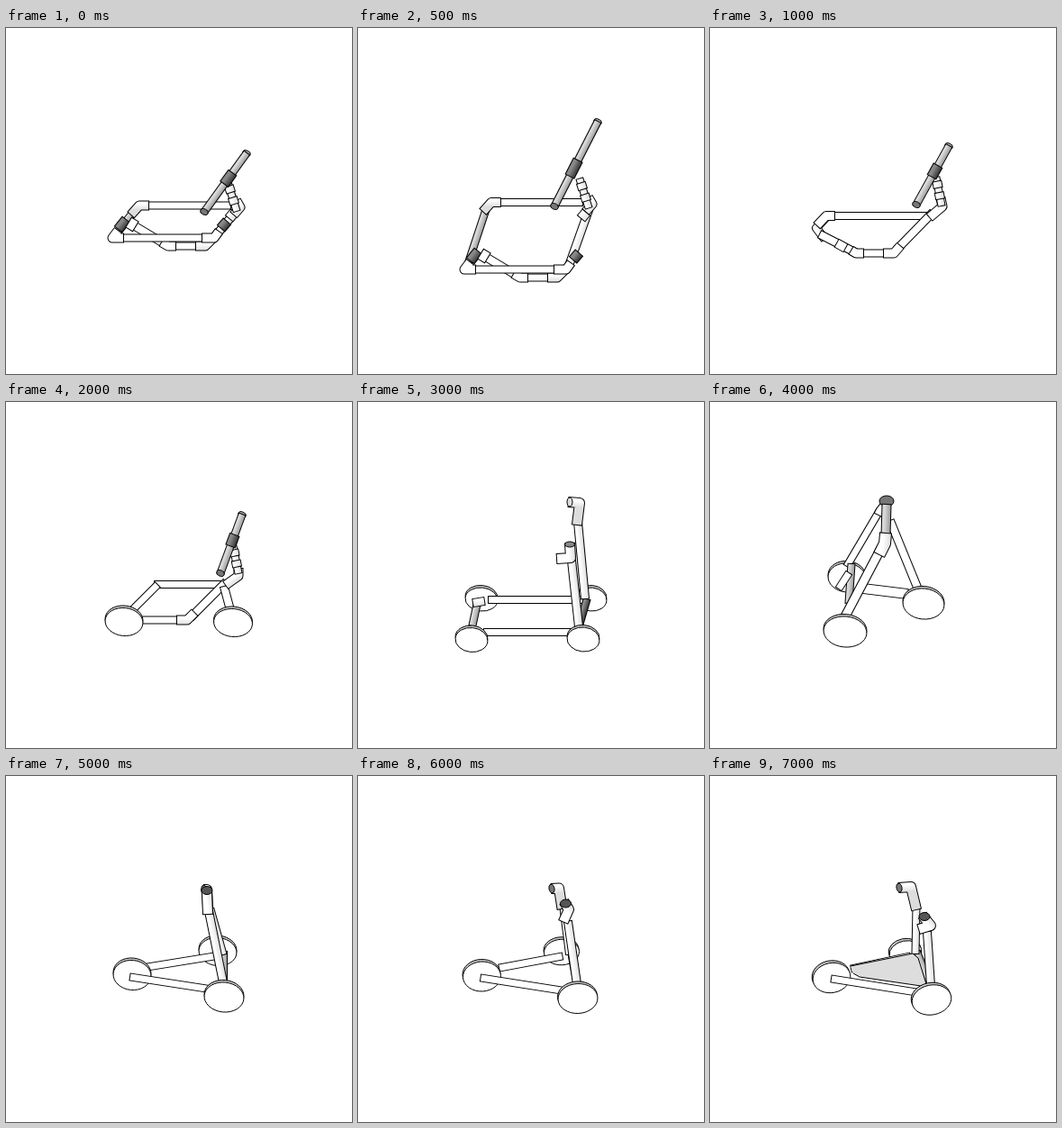
These frames come from a looping animation (384x384 px, 7.5 s). An HTML page with a canvas:

```html
<!DOCTYPE html>
<html>
<head>
<meta charset="utf-8">
<style>
html, body { margin: 0; width: 100%; height: 100%; overflow: hidden; background: #fff; }
canvas { display: block; }
</style>
</head>
<body>
<canvas id="stage" width="384" height="384"></canvas>
<script>
const ctx = document.getElementById('stage').getContext('2d');
const WHITE = ['#fff', '#fff'], PALE = ['#fff', '#ddd'], GREY = ['#d8d8d8', '#999'], DARK = ['#888', '#333'];

function trace(pts) {
  ctx.beginPath();
  pts.forEach(p => ctx.lineTo(p[0], p[1]));
}

// Outlined tube through points; the shade runs across its first section.
function pipe(pts, w, shade = WHITE) {
  const [a, b] = pts, y = pts[pts.length - 1], x = pts[pts.length - 2];
  const away = (p, q) => {
    const d = Math.hypot(p[0] - q[0], p[1] - q[1]) || 1;
    return [p[0] + (p[0] - q[0]) / d, p[1] + (p[1] - q[1]) / d];
  };
  ctx.lineJoin = 'round';
  ctx.strokeStyle = '#000';
  ctx.lineWidth = w + 1;
  trace([away(a, b), ...pts.slice(1, -1), away(y, x)]);
  ctx.stroke();
  const len = Math.hypot(b[0] - a[0], b[1] - a[1]) || 1;
  const nx = (b[1] - a[1]) / len * w / 2, ny = (a[0] - b[0]) / len * w / 2;
  const s = nx + ny > 0 ? -1 : 1;
  const g = ctx.createLinearGradient(a[0] + nx * s, a[1] + ny * s, a[0] - nx * s, a[1] - ny * s);
  g.addColorStop(0.3, shade[0]);
  g.addColorStop(1, shade[1]);
  ctx.strokeStyle = g;
  ctx.lineWidth = w - 1;
  trace(pts);
  ctx.stroke();
}

const tube = (x1, y1, x2, y2, w, shade) => pipe([[x1, y1], [x2, y2]], w, shade);

function disc(x, y, rx, ry, fill, tilt = 0) {
  ctx.beginPath();
  ctx.ellipse(x, y, rx, ry, tilt, 0, 7);
  ctx.fillStyle = fill;
  ctx.fill();
  ctx.strokeStyle = '#000';
  ctx.lineWidth = 1;
  ctx.stroke();
}

function wheel(x, y, rx, ry, tilt = 0.1, dx = 0) {
  disc(x + dx, y - 2.5, rx, ry, '#ccc', tilt);
  disc(x, y, rx, ry, '#fff', tilt);
}

// Straight grey handlebar with a dark coupling at part m of its length.
function handlebar(x1, y1, x2, y2, m) {
  const at = k => [x1 + (x2 - x1) * k, y1 + (y2 - y1) * k];
  disc(x2, y2, 4.5, 3, '#aaa', 0.4);
  tube(x1, y1, x2, y2, 8, GREY);
  pipe([at(m - 0.09), at(m + 0.09)], 11, DARK);
  disc(x1, y1, 4.5, 3.2, '#777', 0.4);
}

function stem(x1, y1, x2, y2) {
  tube(x1, y1, x2, y2, 8, PALE);
  for (const k of [0.25, 0.65]) {
    const x = x1 + (x2 - x1) * k, y = y1 + (y2 - y1) * k;
    tube(x, y, x + (x2 - x1) * 0.2, y + (y2 - y1) * 0.2, 10, PALE);
  }
}

function boxFrame(deep = 0) {
  const top = -deep * 0.1, low = deep;
  tube(157, 197 + top, 249, 197 + top, 8);
  tube(140, 218 + low, 180, 242 + low, 9);
  tube(186, 242 + low, 214, 242 + low, 8);
  pipe([[173, 238 + low], [180, 242 + low], [188, 242 + low]], 10);
  tube(143, 202 + top, 121, 230 + low, 8, GREY);
  pipe([[158, 197 + top], [148, 197 + top], [139, 207 + top]], 10, PALE);
  tube(133, 213 + low, 125, 223 + low, 11, DARK);
  tube(143, 213 + low, 137, 223 + low, 9);
  pipe([[211, 242 + low], [221, 242 + low], [231, 232 + low]], 10, PALE);
  tube(234, 229 + low, 258, 200 + top, 9, PALE);
  tube(239, 222 + low, 245, 215 + low, 11, DARK);
  tube(248, 211, 253, 205, 11, PALE);
  tube(130, 233 + low, 221, 233 + low, 8);
  pipe([[130, 233 + low], [118, 233 + low], [124, 225 + low]], 10);
  pipe([[218, 233 + low], [231, 233 + low], [236, 226 + low]], 10);
  pipe([[253, 207 + top], [260, 199 + top], [256, 192 + top]], 10, PALE);
  stem(256, 203 + top, 246, 171 + top);
}

function flat() {
  boxFrame();
  handlebar(220, 204, 267, 139, 0.57);
}

function tall() {
  boxFrame(35);
  handlebar(218, 198, 266, 104, 0.45);
}

function bent() {
  tube(137, 208.5, 244, 208.5, 8);
  tube(207, 246, 247, 205, 9);
  pipe([[127, 234], [118, 222], [128, 211]], 9, PALE);
  pipe([[138, 208.5], [129, 208.5], [119, 219]], 10);
  tube(122, 229, 161, 249, 9);
  tube(141, 239, 150, 244, 10);
  tube(168, 250, 196, 250, 8);
  pipe([[157, 247], [162, 250], [170, 250]], 10);
  pipe([[193, 250], [204, 250], [211, 242]], 10);
  pipe([[244, 210], [258, 198], [256, 189]], 10);
  stem(257, 197, 251, 166);
  handlebar(229, 196, 265, 131, 0.57);
}

function twoWheels(bx = 238, by = 190, tx = 262, ty = 125) {
  tube(165, 202.5, 241, 202.5, 8);
  tube(168, 203, 139, 232, 8);
  tube(151, 242, 192, 242, 8);
  tube(205, 239, 244, 200, 9);
  pipe([[190, 242], [201, 242], [209, 234]], 10, PALE);
  tube(242, 205, 249, 231, 9);
  wheel(131, 244, 21, 15.5);
  wheel(252, 245, 21.5, 15.5);
  pipe([[244, 203], [258, 193], [258, 185]], 10, PALE);
  stem(258, 190, 252, 160);
  handlebar(bx, by, tx, ty, 0.56);
}

function fourWheels() {
  wheel(137, 219, 18, 13);
  wheel(259, 219, 17, 13);
  tube(145, 219.5, 252, 219.5, 8);
  tube(140, 255.5, 241, 255.5, 8);
  tube(133, 220, 127, 248, 8, GREY);
  tube(128, 223, 140, 221, 9, PALE);
  tube(254, 219, 245, 250, 8, DARK);
  tube(244, 133, 252, 218, 9, PALE);
  pipe([[234, 111], [246, 112], [243, 136]], 11, PALE);
  disc(235, 111, 3, 5, '#ddd');
  tube(237, 176, 245, 249, 9, PALE);
  pipe([[235, 157], [236, 173], [221, 174]], 11, PALE);
  disc(235, 158, 5.5, 3, '#888');
  wheel(126, 264, 18, 13.5);
  wheel(250, 263.5, 18, 13.5);
}

function tripod() {
  wheel(152, 195, 21, 16);
  tube(170, 207, 219, 213, 11);
  tube(188, 121, 152, 182, 8);
  tube(157, 180, 154, 223, 8, GREY);
  tube(154, 190, 143, 207, 8);
  tube(200, 132, 231, 208, 9);
  tube(190, 162, 150, 238, 10);
  wheel(237, 224, 23, 17);
  wheel(150, 255, 24, 17);
  pipe([[196, 112], [189, 121], [187, 125]], 10);
  disc(196, 110, 8, 6, '#777');
  tube(196, 114, 195, 148, 10, GREY);
  pipe([[195, 146], [194, 157], [188, 169]], 13, PALE);
}

// Turning three-wheeler, k = 0 end on to k = 1 turned.
function trike(k, deck) {
  const mix = (a, b) => a + (b - a) * k;
  const P = (x, y, u, v) => [mix(x, u), mix(y, v)];
  const turnWheel = (x, y, u, v, rx, ry) =>
    wheel(mix(x, u), mix(y, v), rx, ry, mix(0.1, -0.2), -k);
  turnWheel(235, 195, 217, 196, mix(21, 18), mix(15.5, 13));
  pipe([P(157, 212, 157, 214), P(231, 200, 222, 200)], 8);
  pipe([P(242, 195, 230, 195), P(242, 232, 243, 228)], 7, GREY);
  pipe([P(227, 148, 229, 145), P(241, 198, 228, 197)], 8, PALE);
  if (deck) {
    trace([[156, 211], [225, 197], [231, 202], [241, 234], [166, 223], [159, 219]]);
    ctx.fillStyle = '#ddd';
    ctx.fill();
    ctx.strokeStyle = '#000';
    ctx.lineWidth = 1;
    ctx.stroke();
  }
  turnWheel(140, 221, 135, 224, 21, 16.5);
  pipe([P(138, 223, 135, 225), P(229, 237, 229, 240)], 8);
  pipe([P(220, 126, 210, 124), P(223, 126, 223, 123), P(224, 146, 229, 148)], 11, PALE);
  const end = P(220, 126, 210, 124);
  disc(end[0], end[1], 3, 5, '#777', -0.2);
  pipe([P(225, 150, 241, 173), P(241, 229, 245, 232)], 9, PALE);
  pipe([P(222, 125, 236, 155), P(223, 130, 245, 166), P(224, 153, 232, 170)], 11, PALE);
  const grip = P(223, 127, 238, 156);
  disc(grip[0], grip[1], 6, 4.5, '#555');
  turnWheel(242, 245.5, 246, 248.5, 22, 16.5);
}

function scaled(scene, sx, sy) {
  ctx.save();
  ctx.translate(192, 192);
  ctx.scale(sx, sy);
  ctx.translate(-192, -192);
  scene();
  ctx.restore();
}

const scenes = [
  flat,
  tall,
  bent,
  () => scaled(() => twoWheels(235, 192, 263, 127), 1.015, 1),
  () => twoWheels(),
  () => scaled(() => twoWheels(243, 187, 259, 123), 1.065, 1.08),
  fourWheels,
  () => scaled(tripod, 1.02, 1.01),
  tripod,
  () => scaled(() => trike(0), 1.07, 1),
  () => trike(0),
  () => trike(0.25),
  () => trike(0.5),
  () => trike(0.75),
  () => trike(1, true)
];

const start = performance.now();
function draw() {
  const step = Math.floor((performance.now() - start) / 500) % scenes.length;
  ctx.fillStyle = '#fff';
  ctx.fillRect(0, 0, 384, 384);
  scenes[step]();
  requestAnimationFrame(draw);
}
draw();
</script>
</body>
</html>
```
